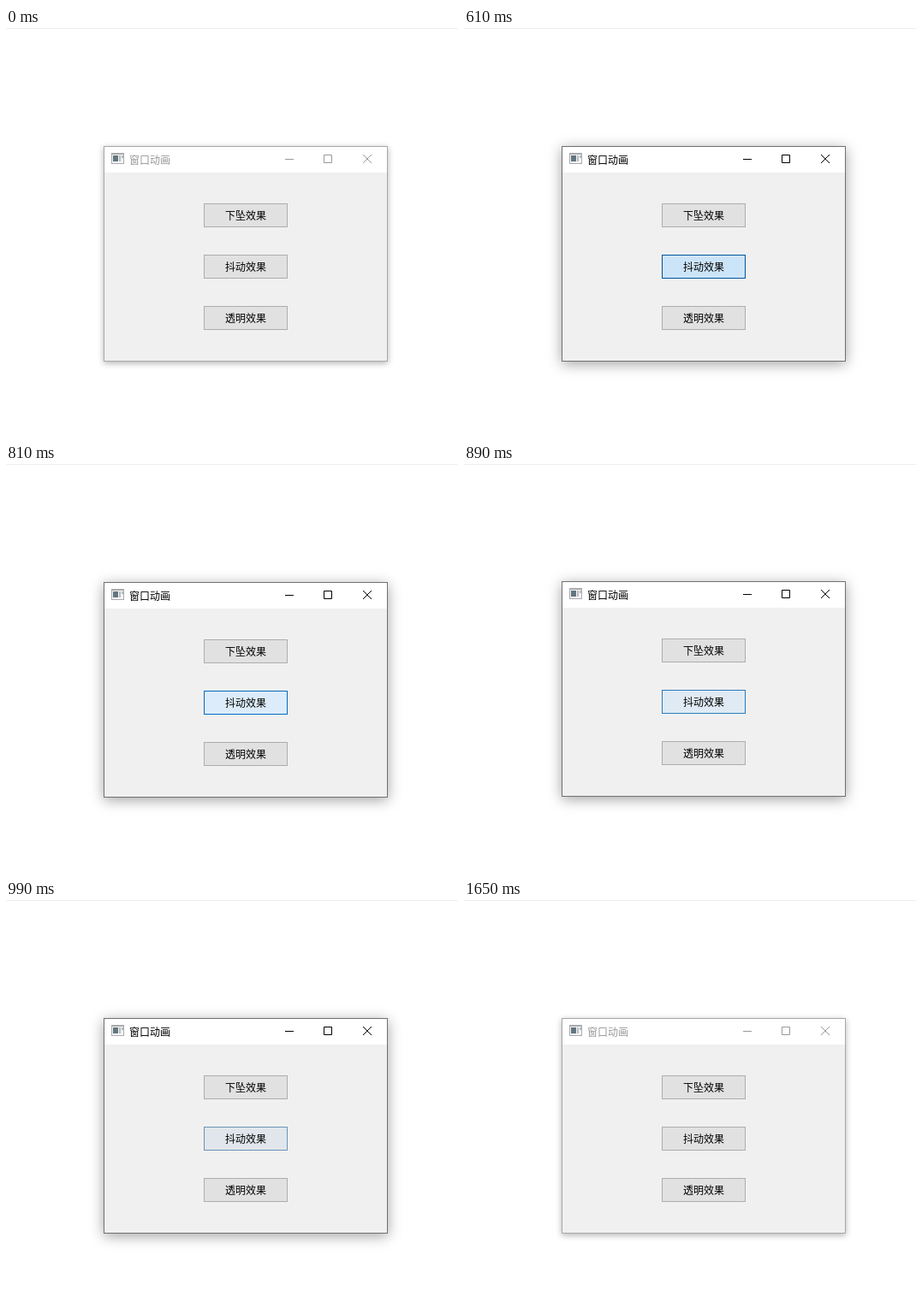
Recreate the animation shown at these times as an HTML page. Size 528 by 477 pixels, loop 1710 ms.

```html
<!DOCTYPE html>
<html lang="zh-CN">
<head>
<meta charset="utf-8">
<style>
html, body { margin: 0; width: 100%; height: 100%; overflow: hidden; background: #fff; }
body { position: relative; font: 12px/28px "Noto Sans CJK SC", "Noto Sans CJK", sans-serif; color: #000; }
body::before { content: ""; position: absolute; width: 100%; height: 1px; background: #eee; }
#win {
  position: absolute; left: 114px; top: 138px; width: 330px; height: 250px;
  border: 1px solid #a8a8a8; background: #f0f0f0; color: #999;
  box-shadow: 0 2px 7px rgba(0, 0, 0, .3);
}
#win.active { border-color: #707070; color: #000; box-shadow: 0 3px 15px rgba(0, 0, 0, .36); }
#bar { height: 30px; background: #fff; line-height: 29px; text-indent: 29px; white-space: nowrap; }
svg { position: absolute; left: 0; top: 0; }
.btn {
  position: absolute; left: 116px; width: 96px; height: 26px; line-height: 26px;
  border: 1px solid #adadad; background: #e1e1e1; color: #000; text-align: center;
}
</style>
</head>
<body>
<div id="win">
  <div id="bar">窗口动画</div>
  <svg width="330" height="30" fill="none" stroke="currentColor">
    <g stroke="none">
      <path fill="#aaa" d="M8 7h15v13h-15z"/>
      <path fill="#f5f5f5" d="M9 9h13v10h-13z"/>
      <path id="pane" fill="#627680" d="M10 10h6v7h-6z"/>
      <path fill="#b4bcc4" d="M17 10h2v7h-2zM20 10h2v3h-2z"/>
    </g>
    <path d="M211 14.5h10M256.500 9.500h9v9h-9zM302 9l10 10M312 9l-10 10"/>
  </svg>
  <div class="btn" style="top:66px">下坠效果</div>
  <div class="btn" style="top:126px" id="shake">抖动效果</div>
  <div class="btn" style="top:186px">透明效果</div>
</div>
<script>
const LOOP = 1710, PRESS = 560, RELEASE = 640, LEAVE = 830, END = 990;
const win = document.getElementById('win');
const btn = document.getElementById('shake');

// each state: fill, then border
const normal = [225, 225, 225, 173, 173, 173];
const hover = [229, 241, 251, 0, 120, 215];
const pressed = [204, 228, 247, 0, 84, 153];

const ramp = (t, a, b) => Math.min(1, Math.max(0, (t - a) / (b - a)));
const mix = (a, b, k) => a.map((v, i) => Math.round(v + (b[i] - v) * k));

// the screen refreshes in 20 ms steps while the window shakes
function snap(t) {
  if (t < 720) return t;
  if (t < 810) return 720 + 20 * Math.min(3, Math.floor((t - 720) / 20));
  return Math.min(1070, 810 + 20 * Math.floor((t - 810) / 20));
}

function offset(t) {
  if (t < RELEASE || t >= END) return 0;
  const p = (t - RELEASE) / 85 % 1;
  return -Math.round(4.5 * (1 - Math.abs(2 * p - 1)));
}

function buttonColor(t) {
  if (t < 450) return normal;
  if (t < PRESS) return mix(normal, hover, ramp(t, 410, 540));
  const lit = t < RELEASE
    ? mix(hover, pressed, ramp(t, PRESS, 600))
    : mix(pressed, hover, ramp(Math.min(t, LEAVE), 604, 925));
  return mix(lit, normal, ramp(t, LEAVE, 1090));
}

function draw(now) {
  const time = now % LOOP, t = snap(time);
  win.className = time >= PRESS && time < 1650 ? 'active' : '';
  win.style.top = 138 + offset(t) + 'px';
  const c = time < 1650 ? buttonColor(t) : normal;
  btn.style.background = `rgb(${c.slice(0, 3)})`;
  btn.style.borderColor = `rgb(${c.slice(3)})`;
  requestAnimationFrame(draw);
}
requestAnimationFrame(draw);
</script>
</body>
</html>
```
